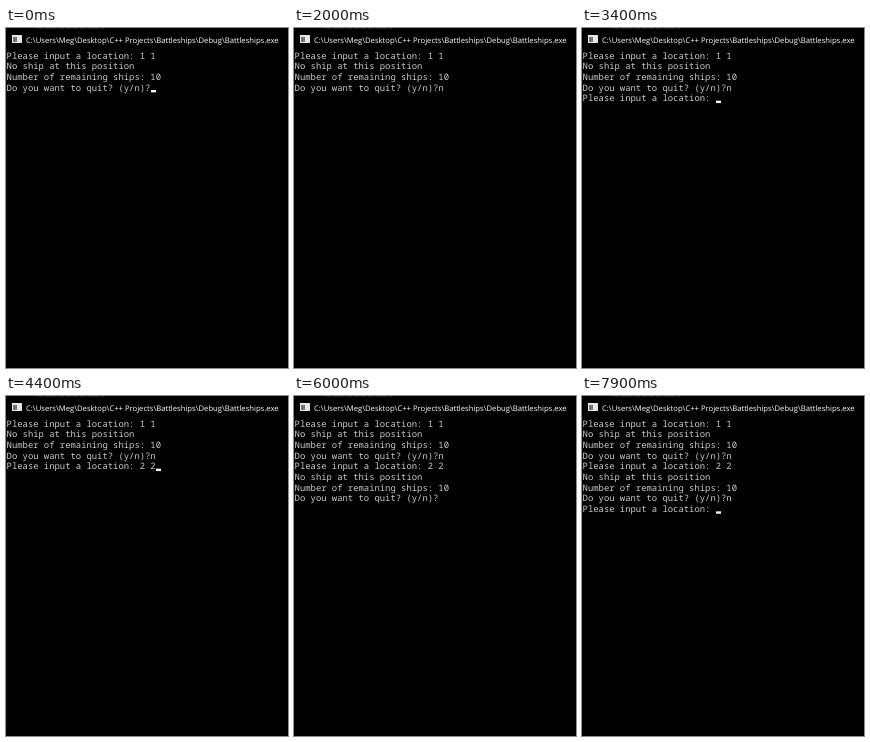
Write an HTML page that moves like this. It is 282x340 px and loops after 8 s.

```html
<!DOCTYPE html>
<html lang="en">
<head>
<meta charset="utf-8">
<title>Console session</title>
<style>
  html, body { margin: 0; width: 100%; height: 100%; overflow: hidden; background: #000; }
  svg { display: block; width: 282px; height: 340px; }
  text { white-space: pre; text-rendering: geometricPrecision; }
  .title { font: 500 7.66px "Open Sans", "Noto Sans", sans-serif; fill: #fff; }
  .row { font: 8.889px "Noto Sans Mono", "DejaVu Sans Mono", monospace; fill: #ccc; }
</style>
</head>
<body>
<svg viewBox="0 0 282 340">
  <rect width="282" height="340" fill="#000"/>
  <path d="M32 0.5H98" stroke="#222" stroke-dasharray="5 2"/>
  <rect y="22" width="0.5" height="315" fill="#1c1c1c"/>
  <rect x="6" y="7" width="10" height="8" fill="#e8e8e8"/>
  <rect x="7" y="9" width="4" height="5" fill="#5f7f78"/>
  <text class="title" x="20" y="15">C:\Users\Meg\Desktop\C++ Projects\Battleships\Debug\Battleships.exe</text>
  <g id="rows"></g>
  <rect id="cursor" width="5" height="2.4" fill="#f2f2f2"/>
</svg>
<script>
const LOOP = 8000, BLINK = 530;
const LEFT = 0.6, TOP = 22, CELL_W = 16 / 3, CELL_H = 32 / 3;

const ask = 'Please input a location: ';
const reply = 'No ship at this position\nNumber of remaining ships: 10\nDo you want to quit? (y/n)?';

// [time of key press, text it adds to the console]
const steps = [
  [-230, ask + '1 1\n' + reply],
  [1100, 'n'],
  [2300, '\n' + ask],
  [3700, '2'],
  [3900, ' '],
  [4150, '2'],
  [4950, '\n' + reply],
  [7000, 'n'],
  [7500, '\n' + ask]
];

const rowBox = document.getElementById('rows');
const cursor = document.getElementById('cursor');
const rows = Array.from({ length: 9 }, (_, i) => {
  const el = document.createElementNS('http://www.w3.org/2000/svg', 'text');
  el.setAttribute('class', 'row');
  el.setAttribute('x', LEFT);
  el.setAttribute('y', TOP + 8.8 + i * CELL_H);
  return rowBox.appendChild(el);
});

function draw(t) {
  const done = steps.filter(([at]) => at <= t);
  const lines = done.map(([, text]) => text).join('').split('\n');
  rows.forEach((el, i) => {
    const line = lines[i] || '';
    if (el.textContent !== line) el.textContent = line;
  });

  // each key press restarts the blink
  const since = t - done[done.length - 1][0];
  const last = lines.length - 1;
  cursor.setAttribute('x', Math.round(LEFT + lines[last].length * CELL_W));
  cursor.setAttribute('y', TOP + (last + 0.75) * CELL_H);
  cursor.setAttribute('visibility', Math.floor(since / BLINK) % 2 ? 'hidden' : 'visible');
}

const start = performance.now();
function tick() {
  draw((performance.now() - start) % LOOP);
  requestAnimationFrame(tick);
}
tick();
</script>
</body>
</html>
```
